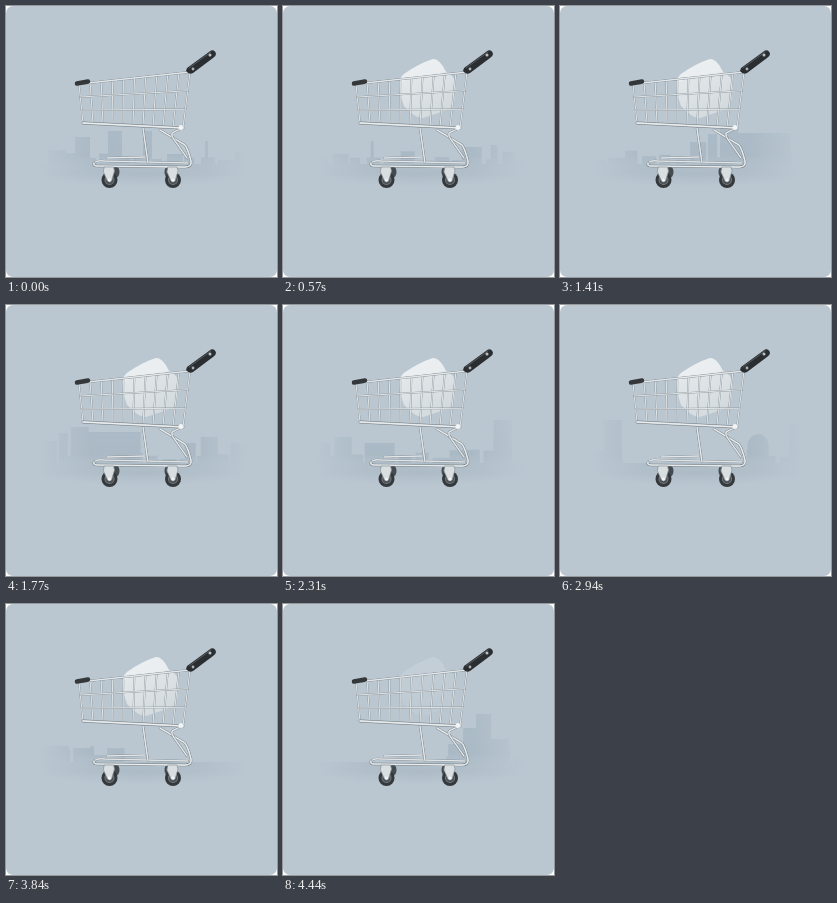
Write an HTML page that moves like this. It is 271 px wide and 271 px high and loops after 4.5 s.

```html
<!DOCTYPE html>
<html lang="en">
<head>
<meta charset="utf-8">
<title>Shopping cart</title>
<style>
html, body { margin: 0; height: 100%; overflow: hidden; background: #fff; }
svg { display: block; width: 100vw; height: 100vh; }
path { stroke-linecap: round; stroke-linejoin: round; }
</style>
</head>
<body>
<svg viewBox="0 0 271 271">
  <defs>
    <linearGradient id="haze" gradientUnits="userSpaceOnUse" x1="0" y1="112" x2="0" y2="173">
      <stop offset="0" stop-color="#a7b7c3" stop-opacity=".75"/>
      <stop offset=".6" stop-color="#a7b7c3" stop-opacity=".85"/>
      <stop offset="1" stop-color="#a7b7c3" stop-opacity="0"/>
    </linearGradient>
    <linearGradient id="sides" gradientUnits="userSpaceOnUse" x1="34" y1="0" x2="240" y2="0">
      <stop offset="0" stop-color="#000"/>
      <stop offset=".25" stop-color="#fff"/>
      <stop offset=".75" stop-color="#fff"/>
      <stop offset="1" stop-color="#000"/>
    </linearGradient>
    <radialGradient id="ground">
      <stop offset="0" stop-color="#a3b2be" stop-opacity=".5"/>
      <stop offset="1" stop-color="#a3b2be" stop-opacity="0"/>
    </radialGradient>
    <linearGradient id="stone" x1="0" y1="0" x2=".6" y2="1">
      <stop offset="0" stop-color="#e9edef"/>
      <stop offset="1" stop-color="#d3dade"/>
    </linearGradient>
    <mask id="fade" maskUnits="userSpaceOnUse" x="0" y="0" width="271" height="271">
      <rect width="271" height="271" fill="url(#sides)"/>
    </mask>
  </defs>

  <rect width="271" height="271" rx="7" fill="#bac7d1"/>
  <ellipse cx="136" cy="168" rx="102" ry="13" fill="url(#ground)"/>
  <g mask="url(#fade)"><path id="city" fill="url(#haze)"/></g>

  <g id="load">
    <path d="M121 68Q135 58 150 53Q157 53 163 66Q172 70 173 78L171 97Q170 102 164 104L140 112Q133 113 121 100Q116 86 116 77Q117 71 121 68Z" fill="url(#stone)"/>
    <path d="M121 68Q135 58 150 53Q157 53 163 66L128 72L116 77Z" fill="#f0f3f4" opacity=".65"/>
  </g>

  <g fill="#454b50">
    <ellipse cx="110" cy="166" rx="3.5" ry="5.5"/>
    <ellipse cx="162" cy="166" rx="3.5" ry="5.5"/>
  </g>
  <g id="metal" fill="none"></g>
  <g id="wheels"></g>

  <path d="M71 77.5L82 75.5" stroke="#34383b" stroke-width="4.5"/>
  <path d="M181 62L205 44.5Q209 43.5 210 48Q210 50 207 52L187 67Q183 69 180 65Z" fill="#2b2e31"/>
  <path d="M183 62L205 46" stroke="#565b5f"/>
  <circle cx="204" cy="49" r="1.5" fill="#b9bfc3"/>
  <circle cx="187" cy="63" r="1.4" fill="#aab1b6"/>
</svg>

<script>
const LOOP = 4500, STEP = 30, START = 150, SPEED = 0.265;
const $ = id => document.getElementById(id);

let seed = 7;
const random = () => (seed = seed * 16807 % 2147483647) / 2147483647;

// Skyline: low seeded blocks, then the landmarks as left edge, width, roof height
const block = (x, w, top) => `M${x} ${top}h${w}V175h${-w}Z`;
let skyline = block(0, 1400, 158);
for (let x = 42; x < 1400; x += 17) {
  const top = 144 + random() * 11, w = 10 + random() * 8;
  const flat = x > 795 && x < 920 || x > 1090 && x < 1290;
  if (!flat) skyline += block(x, w, top);
}
const landmarks = [
  [69, 15, 131], [102, 14, 125], [137, 9, 125], [199, 3, 135],
  [290, 20, 141], [319, 7, 139], [464, 16, 136],
  [482, 9, 128], [494, 18, 122], [512, 52, 127],
  [608, 11, 138], [624, 17, 132], [654, 30, 138],
  [783, 18, 115], [969, 18, 118], [999, 42, 142], [1062, 4, 142],
  [1302, 15, 140], [1317, 13, 124], [1330, 15, 110], [1345, 18, 135]
];
for (const mark of landmarks) skyline += block(...mark);
skyline += 'M927 175V141A10.5 12 0 0 1 948 141V175Z';
$('city').setAttribute('d', skyline);

// A tube is a dark outline with a lighter core and a highlight
function tube(d, width) {
  const layers = [['#737c82', 1], ['#c9d0d4', .7], ['#f4f6f7', .32]];
  return layers.map(([color, k]) =>
    `<path d="${d}" stroke="${color}" stroke-width="${width * k}"/>`).join('');
}

// Point in the basket's side, u across and v down
const mix = (a, b, k) => a + (b - a) * k;
const side = (u, v) =>
  `${mix(mix(73, 184, u), mix(77, 177, u), v)} ${mix(mix(78, 66, u), mix(117, 122, u), v)}`;
const wire = (u, v, u2, v2, width) => tube(`M${side(u, v)}L${side(u2, v2)}`, width);

let metal = tube('M101 152L139 151', 2.2) +
  tube('M88 157Q91 154 98 155L182 157', 2) +
  tube('M137 122L142 157', 2.2) +
  tube('M154 124L179 139Q182 143 185 155Q186 161 179 161L91 160Q87 160 88 157', 2.5) +
  tube('M176 122L166 127Q165 130 169 135L181 152', 2.2);
for (let i = 0; i <= 10; i++) metal += wire(i / 10, 0, i / 10, 1, 1.6);
for (let i = 0; i <= 3; i++) metal += wire(0, i / 3, 1, i / 3, [2.2, 1.5, 1.5, 2.8][i]);
metal += '<circle cx="175" cy="121.5" r="2.5" fill="#f1f3f4"/>';
$('metal').innerHTML = metal;

$('wheels').innerHTML = [103.5, 167].map(x => `
  <g transform="translate(${x} 174)">
    <circle r="8" fill="#35393c"/>
    <circle r="5" fill="#737a7f"/>
    <circle r="4" fill="#4b5156"/>
    <path d="M-5 -13H4L5 -9L2 1Q0 3 -2 1L-6 -8Z" fill="#d9dee1" stroke="#8c959b" stroke-width=".7"/>
    <circle r="1.6" fill="#f3f5f6"/>
  </g>`).join('');

const clamp = k => Math.min(1, Math.max(0, k));

function draw(now) {
  const t = Math.floor(now % LOOP / STEP) * STEP;
  $('city').setAttribute('transform', `translate(${-SPEED * Math.max(0, t - START)} 0)`);
  const fall = clamp((t - START) / 420);
  const bounce = clamp((t - 570) / 120);
  const y = -115 * (1 - fall * fall) - 3 * Math.sin(Math.PI * bounce);
  $('load').setAttribute('transform', `translate(0 ${y})`);
  // The load is out of sight until it drops, and fades at the end
  $('load').setAttribute('opacity', t < START + STEP ? 0 : 1 - .8 * clamp((t - 3990) / 450));
}

const begin = performance.now();
function tick() {
  draw(performance.now() - begin);
  requestAnimationFrame(tick);
}
tick();
</script>
</body>
</html>
```
